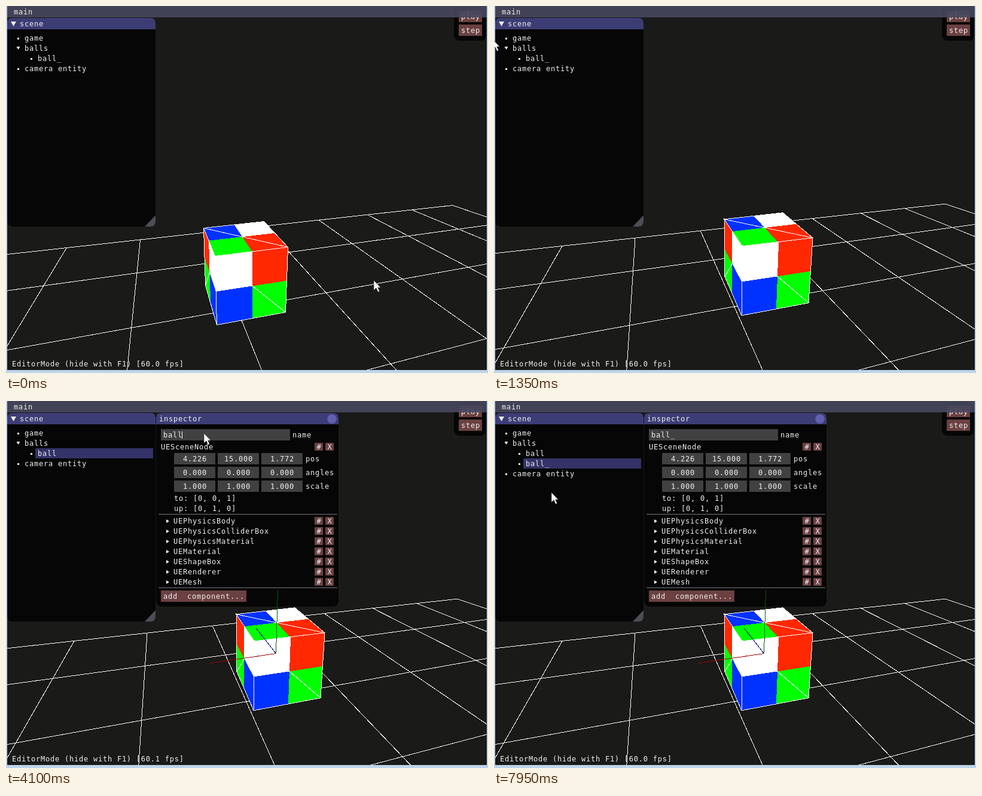
Recreate the animation shown at these times as an HTML page. Size 806 px wide and 614 px high, loop 8000 ms.

```html
<!DOCTYPE html>
<html lang="en">
<head>
<meta charset="utf-8">
<title>Scene editor</title>
<style>
html, body { margin: 0; width: 100%; height: 100%; overflow: hidden; background: #1a1a18; }
svg { display: block; width: 806px; height: 614px; }
text { font: 12px "DejaVu Sans Mono", "Noto Sans Mono", monospace; letter-spacing: .77px; fill: #f0f0f0; white-space: pre; }
.crisp { shape-rendering: crispEdges; }
.wire { stroke: #fff; fill: none; }
</style>
</head>
<body>
<svg id="stage" viewBox="0 0 806 614"></svg>
<script>
const LOOP = 8000, STEP = 50;
const HOVER = 1700, PRESS = 1950, SELECT = 2000, LEAVE = 2250;
const FOCUS = 3600, RENAME = 3650, BLUR = 4250, MENU = 5250, DUPLICATE = 7000;
const PANEL = '#060606', TITLE = '#3d3d76', FIELD = '#414141', BUTTON = '#6b4141';
const INK = '#f0f0f0', RULE = '#78787c', FRAME = '#bdd4ea';
const RED = '#ff2800', GREEN = '#00ff00', BLUE = '#0032ff', WHITE = '#fff';
const HORIZON = 160;

// Two camera poses: the floor patch four cells wide and two deep, and the visible
// cube corners (top face from back left, then bottom back left, front left, front right).
const poseA = {
  floor: [[224, 390.5], [604, 348.7], [772.6, 436.6], [209.2, 537.8]],
  cube: [[330, 371], [431, 360], [471, 403], [349, 418], [333, 467], [352, 533], [467, 512]],
  pointer: [[615, 459]]
};
const poseB = {
  floor: [[235, 389.3], [612, 347.6], [784.7, 435.5], [225.6, 536.6]],
  cube: [[381, 367], [479, 356], [529, 398], [411, 412], [382, 463], [410, 528], [522, 507]],
  pointer: [[652, 424]]
};
// Pointer moves after the drag: start, end, destination.
const moves = [
  [900, 1000, -20, 50], [1250, 1800, 79, 82], [2150, 2600, 342, 81], [2600, 2800, 411, 70],
  [2800, 3000, 331, 54], [4900, 5300, 32, 14], [5450, 5650, 27, 9], [6000, 6500, 91, 160],
  [6900, 7250, 96, 153]
];

const lerp = (a, b, k) => a + (b - a) * k;
const mix = (a, b, k) => a.map((v, i) => lerp(v, b[i], k));
const ramp = (t, from, to) => Math.min(1, Math.max(0, (t - from) / (to - from)));
const dragAt = t => .2 * ramp(t, 0, 150) + .8 * ramp(t, 300, 650);
const liftAt = t => ramp(t, 650, 750);
const poseAt = (t, part) => poseA[part].map((p, i) => mix(p, poseB[part][i], dragAt(t)));

function pointerAt(t) {
  return moves.reduce((at, [from, to, x, y]) => mix(at, [x, y], ramp(t, from, to)),
    poseAt(t, 'pointer')[0]);
}

// Perspective map of the unit square onto a quad.
function projector([a, b, c, d]) {
  const s = [0, 1].map(i => a[i] - b[i] + c[i] - d[i]);
  const p = [0, 1].map(i => b[i] - c[i]), q = [0, 1].map(i => d[i] - c[i]);
  const det = p[0] * q[1] - p[1] * q[0];
  const g = (s[0] * q[1] - s[1] * q[0]) / det, h = (p[0] * s[1] - p[1] * s[0]) / det;
  return (u, v) => [0, 1].map(i =>
    (a[i] + (b[i] - a[i] + g * b[i]) * u + (d[i] - a[i] + h * d[i]) * v) / (1 + g * u + h * v));
}

const rect = (x, y, w, h, fill, more = '') =>
  `<rect x="${x}" y="${y}" width="${w}" height="${h}" fill="${fill}" ${more}/>`;
const text = (x, mid, str, more = '') => `<text x="${x}" y="${mid + 4}" ${more}>${str}</text>`;
const poly = (points, fill) =>
  `<polygon points="${points.map(p => p.map(v => v.toFixed(1))).join(' ')}" fill="${fill}"/>`;
const path = (d, fill, more = '') => `<path d="${d}" fill="${fill}" ${more}/>`;
const bullet = (x, y) => rect(x - 1, y - 1, 3, 3, INK);
const toolButton = (x, y, label) => rect(x, y, 14, 13, BUTTON) + text(x + 3.5, y + 7, label);
const tools = mid => toolButton(516, mid - 7, '#') + toolButton(534, mid - 7, 'X');
const panel = (x, w, bottom, title, titleX) =>
  rect(x, 20, w, bottom - 20, PANEL, 'rx="9"') +
  path(`M${x} 39V29q0-9 9-9h${w - 18}q9 0 9 9v10z`, TITLE) + text(titleX, 30, title);

function floor(t) {
  const shift = liftAt(t);
  const at = projector(poseAt(t, 'floor').map(([x, y]) =>
    [x + .6 * shift, y - .0075 * (y - HORIZON) * shift]));
  const line = (c0, r0, c1, r1) => `M${at((c0 - 1) / 4, r0 / 2)}L${at((c1 - 1) / 4, r1 / 2)}`;
  let d = '';
  for (let row = 0; row < 4; row++) d += line(-1, row, 7, row);
  for (let col = 0; col < 8; col++) d += line(col, 0, col, 3.9);
  return path(d, 'none', 'class="wire"');
}

function cubeFace(quad, colors) {
  const at = projector(quad);
  return colors.map((color, i) => {
    const u = i % 2 / 2, v = (i >> 1) / 2;
    return poly([at(u, v), at(u + .5, v), at(u + .5, v + .5), at(u, v + .5)], color);
  }).join('');
}

function cube(t) {
  const shift = liftAt(t);
  const [a, b, c, d, e, f, g] = poseAt(t, 'cube').map(([x, y]) => [x + 3.5 * shift, y - 10.7 * shift]);
  const edges = `M${a}L${b} ${c} ${d} ${a} ${e} ${f} ${g} ${c} ${a}M${e}L${d} ${f}M${d}L${g}`;
  return cubeFace([a, d, f, e], [RED, WHITE, GREEN, BLUE]) +
    cubeFace([d, c, g, f], [WHITE, RED, BLUE, GREEN]) +
    cubeFace([a, b, c, d], [BLUE, WHITE, GREEN, RED]) +
    path(edges, 'none', 'class="wire"');
}

function tree(t) {
  const names = [t < RENAME ? 'ball_' : 'ball'];
  if (t >= DUPLICATE) names.push('ball_');
  const lastY = 71 + 17 * names.length;
  const rowColor = t < HOVER ? 'none' : t >= LEAVE ? '#333369'
    : t >= PRESS && t < SELECT ? '#6e6eb0' : '#5c5cb8';
  return rect(49, lastY - 9, 197, 17, rowColor) +
    names.map((name, i) => bullet(42, 88 + 17 * i) + text(53, 88 + 17 * i, name)).join('') +
    bullet(20, lastY + 17) + text(31, lastY + 17, 'camera entity');
}

function vectorRow(mid, values, label) {
  return values.map((v, i) => {
    const x = 281 + 73 * i;
    return rect(x, mid - 10, 69, 19, FIELD) + text(x + 35, mid, v, 'text-anchor="middle"');
  }).join('') + text(501, mid, label);
}

const axis = (x, y, color) => path(`M451 422L${x} ${y}`, 'none', `stroke="${color}"`);
const components = ['PhysicsBody', 'PhysicsColliderBox', 'PhysicsMaterial', 'Material',
  'ShapeBox', 'Renderer', 'Mesh'];
const inspector = panel(251, 305, 344, 'inspector', 256) +
  '<circle cx="545" cy="30" r="7.8" fill="#5f5fae"/>' +
  rect(259, 47, 216, 19, FIELD) + text(479, 57, 'name') +
  text(259, 77, 'UESceneNode') + tools(77) +
  vectorRow(97, ['4.226', '15.000', '1.772'], 'pos') +
  vectorRow(120, Array(3).fill('0.000'), 'angles') +
  vectorRow(143, Array(3).fill('1.000'), 'scale') +
  text(281, 163, 'to: [0, 0, 1]') + text(281, 180, 'up: [0, 1, 0]') +
  rect(255, 189, 299, 1, RULE) +
  components.map((name, i) => {
    const y = 201 + 17 * i;
    return path(`M268 ${y - 3}l5 3-5 3z`, INK) + text(280, y, 'UE' + name) + tools(y);
  }).join('') +
  rect(255, 312, 299, 1, RULE) +
  rect(259, 317, 143, 19, BUTTON) + text(263, 327, 'add  component...') +
  '<g class="crisp" transform="translate(.5 .5)">' +
  axis(454, 316, '#005a00') + axis(418, 380, '#000078') + axis(341, 438, '#a00000') + '</g>';

const scenePanel = panel(2, 248, 369, 'scene', 23) +
  path('M8 26h9l-4.5 8z', INK) +
  path('M232 369L250 350V360q0 9-9 9z', '#4d4d58') +
  bullet(20, 54) + text(31, 54, 'game') +
  path('M17.5 68h6l-3 5z', INK) + text(31, 71, 'balls');

const playPanel = rect(749, 2, 54, 56, PANEL, 'rx="9"') +
  ['play', 'step'].map((label, i) =>
    rect(757, 8 + 23 * i, 39, 19, BUTTON) + text(761, 18 + 23 * i, label)).join('');

const border = rect(0, 0, 2, 614, FRAME) + rect(804, 0, 2, 614, FRAME) + rect(0, 609, 806, 5, FRAME);

document.getElementById('stage').innerHTML =
  rect(0, 0, 806, 614, '#1a1a18') +
  '<g id="world" class="crisp" transform="translate(.5 .5)"></g>' +
  playPanel + scenePanel + '<g id="tree"></g>' +
  `<g id="inspector">${inspector}<text id="name" x="263" y="61"></text>` +
  rect(294, 51, 1, 12, WHITE, 'id="caret"') + '</g>' +
  rect(2, 0, 802, 19, '#47475f', 'opacity=".9"') +
  rect(6, 0, 47, 18, '#6262c4', 'id="menu"') + text(13, 10, 'main') +
  '<text id="status" x="10" y="603"></text>' + border +
  path('M0 0V16.5L4 12.8L7 19.5L9.6 18.3L6.8 12H11.5Z', '#f6f6f6',
    'id="pointer" stroke="#111" stroke-width=".5"');

const el = {};
for (const id of ['world', 'tree', 'inspector', 'name', 'caret', 'menu', 'status', 'pointer'])
  el[id] = document.getElementById(id);
const show = (node, on) => node.setAttribute('visibility', on ? 'inherit' : 'hidden');
const within = (t, from, to) => t >= from && t < to;

function draw(t) {
  const renamed = within(t, RENAME, DUPLICATE);
  el.world.innerHTML = floor(t) + cube(t);
  el.tree.innerHTML = tree(t);
  show(el.inspector, t >= SELECT);
  el.name.textContent = renamed ? 'ball' : 'ball_';
  show(el.caret, within(t, FOCUS, BLUR));
  el.caret.setAttribute('x', renamed ? 294 : 302);
  show(el.menu, within(t, MENU, DUPLICATE));
  el.status.textContent = `EditorMode (hide with F1) [${within(t, 4100, BLUR) ? '60.1' : '60.0'} fps]`;
  el.pointer.setAttribute('transform', `translate(${pointerAt(t).map(Math.round)})`);
}

let start = null, last = -1;
function tick(now) {
  if (start === null) start = now;
  const t = Math.floor((now - start) % LOOP / STEP) * STEP;
  if (t !== last) draw(last = t);
  requestAnimationFrame(tick);
}
draw(0);
requestAnimationFrame(tick);
</script>
</body>
</html>
```
